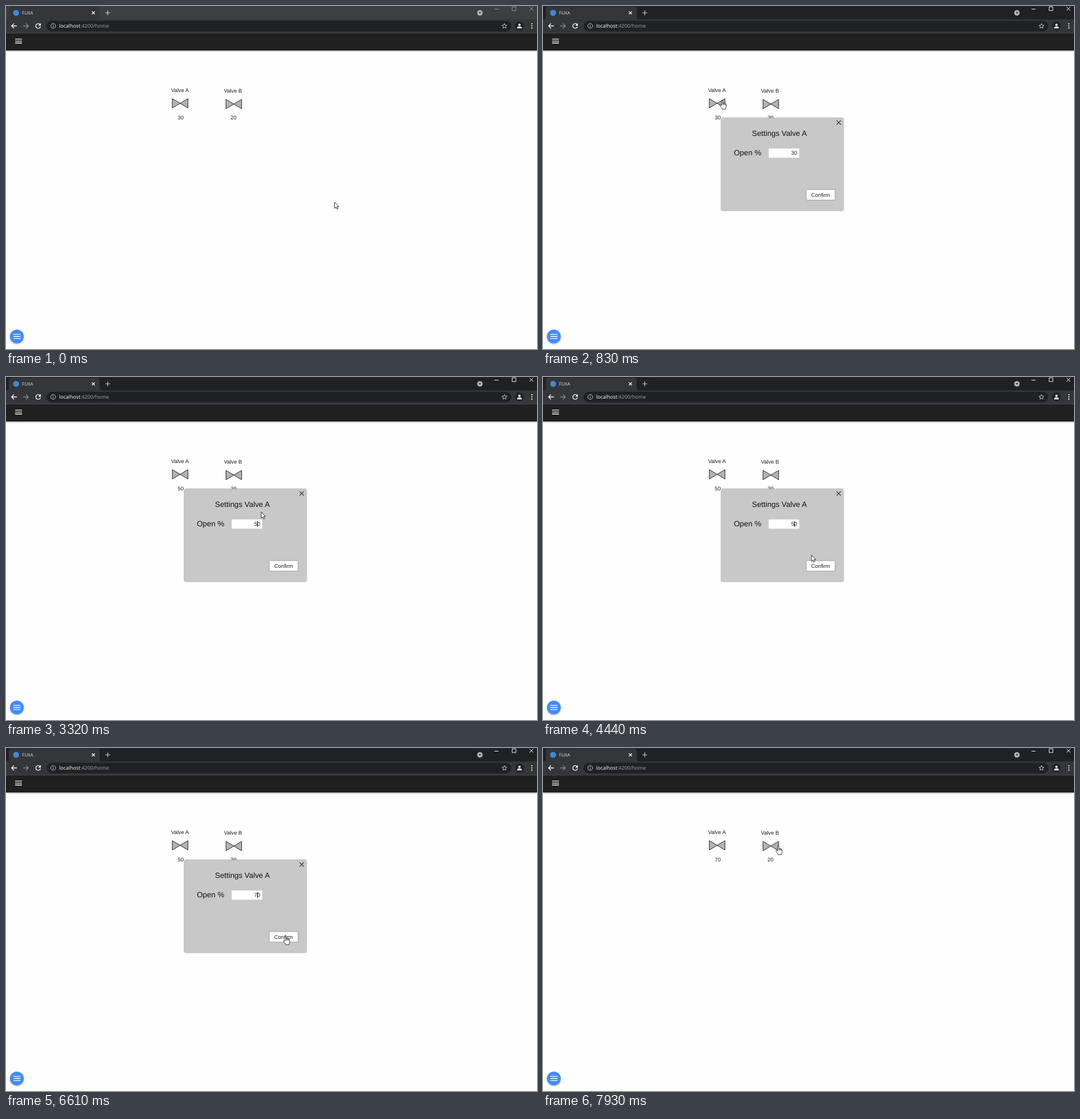
An HTML page that plays this animation: 930x602 px, repeating every 8 s.

```html
<!DOCTYPE html>
<html lang="en">
<head>
<meta charset="utf-8">
<title>Valve settings</title>
<style>
html, body { margin: 0; width: 100%; height: 100%; overflow: hidden; background: #fefefe; }
svg { display: block; width: 930px; height: 602px; }
text { font: 9.33px "Liberation Sans", Arial, sans-serif; fill: #1c1c1c; text-rendering: geometricPrecision; }
.ui { font-family: "Open Sans", "Noto Sans", sans-serif; }
.big { font-size: 13.33px; fill: #111; }
.mid { text-anchor: middle; }
.line { fill: none; stroke: #fff; stroke-width: 1.3; }
.valve { fill: #b3b3b3; stroke: #222; stroke-width: 1; stroke-linejoin: miter; }
.skin { fill: #fff; stroke: #111; stroke-width: .85; stroke-linejoin: round; }
#bar { filter: drop-shadow(0 1px 1.5px rgba(0,0,0,.45)); }
#panel { filter: drop-shadow(0 .7px 1.3px rgba(0,0,0,.6)); }
#ok { filter: drop-shadow(0 .7px 1px rgba(0,0,0,.4)); }
#fab { filter: drop-shadow(0 1px 1.5px rgba(0,0,0,.35)); }
</style>
</head>
<body>
<svg viewBox="0 0 930 602">
  <rect width="930" height="602" fill="#fefefe"/>

  <!-- browser frame -->
  <rect id="title" width="930" height="24"/>
  <path d="M0 24Q5 24 5 19V6Q5 1 10 1H159Q164 1 164 6V19Q164 24 169 24Z" fill="#35363a"/>
  <rect y="23.5" width="930" height="24.5" fill="#35363a"/>
  <rect y="47" width="930" height="1" fill="#4c4e52"/>
  <circle cx="17.7" cy="12" r="5.2" fill="#3f87d9"/>
  <text class="ui" x="28" y="15" style="font-size:8px;fill:#dfe1e5">FUXA</text>
  <path class="line" d="M150.5 9.5l5 5m0-5l-5 5" stroke-width="1"/>
  <path class="line" d="M174 12h8.4M178.2 7.8v8.4" style="stroke:#d5d7da;stroke-width:1.1"/>
  <circle cx="830" cy="12" r="4.8" fill="#b4b6b9"/>
  <path d="M827.7 10.8h4.6l-2.3 2.9z" fill="#2b2c2f"/>
  <path id="controls" fill="none" d="M855.5 5.5h7M886.5 1.5h6.5v6.5h-6.5zM917 1.5l6.5 6.5m0-6.5l-6.5 6.5"/>
  <path class="line" d="M19 35H10M14 30.8L9.8 35L14 39.2"/>
  <path class="line" d="M30 35h9M35 30.8l4.2 4.2l-4.2 4.2" style="stroke:#85878a"/>
  <path class="line" d="M59.6 32.5A4.1 4.1 0 1 0 60.4 36"/>
  <path d="M61 30v4.4h-4.4z" fill="#fff"/>
  <rect x="71" y="26" width="814" height="18.5" rx="9.2" fill="#202124"/>
  <circle cx="82.7" cy="35" r="4.2" fill="none" stroke="#c4c6c9"/>
  <path d="M82.7 34.5v3M82.7 32.4v1.2" stroke="#c4c6c9"/>
  <text class="ui" x="93" y="38.2" style="font-size:8.9px;fill:#a0a3a7"><tspan fill="#fff">localhost</tspan>:4200/home</text>
  <path d="M873 30.8l1.25 2.8 3 .3-2.3 2 .7 3-2.65-1.6-2.65 1.6 .7-3-2.3-2 3-.3z" fill="none" stroke="#d5d7da" stroke-width=".9"/>
  <circle cx="899.3" cy="35" r="7.7" fill="#202124"/>
  <circle cx="899.3" cy="33" r="2.1" fill="#fff"/>
  <path d="M895.2 39.2v-1.1c0-3 8.2-3 8.2 0v1.1z" fill="#fff"/>
  <g fill="#fff"><circle cx="921" cy="31.3" r="1.1"/><circle cx="921" cy="35" r="1.1"/><circle cx="921" cy="38.7" r="1.1"/></g>

  <!-- app -->
  <rect id="bar" y="48" width="930" height="30" fill="#202020"/>
  <path class="line" d="M16 58.2h12M16 61.6h12M16 65h12"/>
  <text x="289.2" y="150.8">Valve A</text>
  <text x="381.7" y="152.1">Valve B</text>
  <path class="valve" d="M291.3 162.6L318.7 179V162.6L291.3 179z"/>
  <path class="valve" d="M385.3 163.9L412.7 180.3V163.9L385.3 180.3z"/>
  <text id="level" class="mid" x="306" y="198.6"></text>
  <text class="mid" x="398.5" y="199.4">20</text>
  <circle id="fab" cx="19" cy="580" r="12" fill="#448aff"/>
  <path class="line" d="M13 576.4h12.4M13 580h12.4M13 583.6h12.4"/>

  <!-- dialog -->
  <g id="dialog">
    <rect id="panel" x="312.5" y="196.7" width="213.5" height="162" rx="1.5" fill="#c8c8c8"/>
    <path d="M514.2 200.7l7.6 7.6m0-7.6l-7.6 7.6" stroke="#3c444c" stroke-width="1.3"/>
    <text class="big" x="366" y="227.7">Settings Valve A</text>
    <text class="big" x="334.2" y="262.2">Open %</text>
    <rect x="395.3" y="250" width="53.3" height="16.2" fill="#fff"/>
    <text id="field" x="445.2" y="261.4" text-anchor="end"></text>
    <rect id="caret" x="440" y="253" width="1" height="10" fill="#000"/>
    <rect id="ok" x="461.7" y="322.8" width="49.2" height="17.2" rx="1" fill="#fff"/>
    <text class="mid" x="486.2" y="334.7">Confirm</text>
  </g>

  <g id="pointer">
    <path id="arrow" class="skin" d="M.5 .3V11.2L3 8.9L4.7 12.6L6.4 11.8L4.8 8.2H8z"/>
    <path id="hand" class="skin" transform="translate(-5 -1)" d="M3.9 9.6V2a1.1 1.1 0 0 1 2.2 0v4.2a1 1 0 0 1 2 .2a1 1 0 0 1 2 .4a.95 .95 0 0 1 1.7 .8v3.7c0 1.6-1 2.3-1.1 4.9H5.1c-.3-1.8-2.6-3.7-4-5.7c-.8-1.2.6-2.2 1.5-1.3zM6.1 6.2v2.5M8.1 6.4v2.4M10.1 6.8v2.2"/>
    <path id="beam" fill="none" stroke="#222" d="M-2.5 -4.5h2L0 -4L.5 -4.5h2M0 -4V4M-2.5 4.5h2L0 4L.5 4.5h2"/>
  </g>
</svg>
<script>
const LOOP = 8000;
const $ = id => document.getElementById(id);
const show = (id, on) => $(id).style.display = on ? '' : 'none';

// pointer legs: first step, last step, step count, x, y, shape on arrival
const legs = [
  [0, 0, 1, 575, 344, 'arrow'],
  [100, 730, 7, 314, 166, 'hand'],
  [910, 910, 1, 343, 170, 'arrow'],
  [1050, 1460, 5, 414, 263, 'beam'],
  [1550, 1640, 2, 441, 259, 'beam'],
  [1740, 1740, 1, 486, 274, 'arrow'],
  [2060, 2060, 1, 486, 274, ''],
  [3320, 3320, 1, 446.5, 236.5, 'arrow'],
  [3420, 3730, 4, 486, 296, 'arrow'],
  [3830, 4040, 3, 476, 320, 'arrow'],
  [4140, 4240, 2, 478, 330, 'hand'],
  [4440, 4660, 3, 446, 262, 'beam'],
  [4760, 4760, 1, 446, 262, ''],
  [6090, 6090, 1, 430.5, 275.5, 'arrow'],
  [6190, 6400, 3, 490, 330, 'hand'],
  [6620, 6620, 1, 490, 331, 'arrow'],
  [6720, 6720, 1, 494.5, 331, 'arrow'],
  [7230, 7430, 3, 434, 214, 'arrow'],
  [7650, 7930, 4, 412, 172, 'hand']
];
const fieldText = [[0, '30'], [2060, '0'], [2480, '50'], [5470, '0'], [5790, '70']];
const levelText = [[0, '30'], [3320, '50'], [6910, '70']];
const caretOn = [[0, 0], [1640, 1], [2160, 0], [2260, 1], [2770, 0], [3100, 1], [3830, 0],
  [4240, 1], [4660, 0], [4960, 1], [5250, 0], [5470, 1]];

const last = (list, t) => list.findLastIndex(row => row[0] <= t);
const value = (list, t) => list[last(list, t)][1];
const ease = u => u * u * (3 - 2 * u);

function pointer(t) {
  const i = last(legs, t);
  const [from, to, n, x, y, shape] = legs[i];
  const [, , , px, py, prev] = legs[Math.max(i - 1, 0)];
  const gap = n > 1 ? (to - from) / (n - 1) : 1;
  const step = Math.min(n, 1 + Math.floor((t - from) / gap + 1e-6));
  const u = ease(step / n);
  return {
    x: px + (x - px) * u,
    y: py + (y - py) * u,
    shape: step === n || prev === shape ? shape : 'arrow'
  };
}

function draw(t) {
  const active = t >= 830;
  $('title').setAttribute('fill', active ? '#202124' : '#3c4043');
  $('controls').setAttribute('stroke', active ? '#f4f4f4' : '#96989a');
  show('dialog', active && t < 6620);
  show('caret', value(caretOn, t));
  $('field').textContent = value(fieldText, t);
  $('level').textContent = value(levelText, t);
  const p = pointer(t);
  $('pointer').setAttribute('transform', `translate(${p.x} ${p.y})`);
  for (const shape of ['arrow', 'hand', 'beam']) show(shape, p.shape === shape);
}

const start = performance.now();
function tick() {
  draw((performance.now() - start) % LOOP);
  requestAnimationFrame(tick);
}
tick();
</script>
</body>
</html>
```
